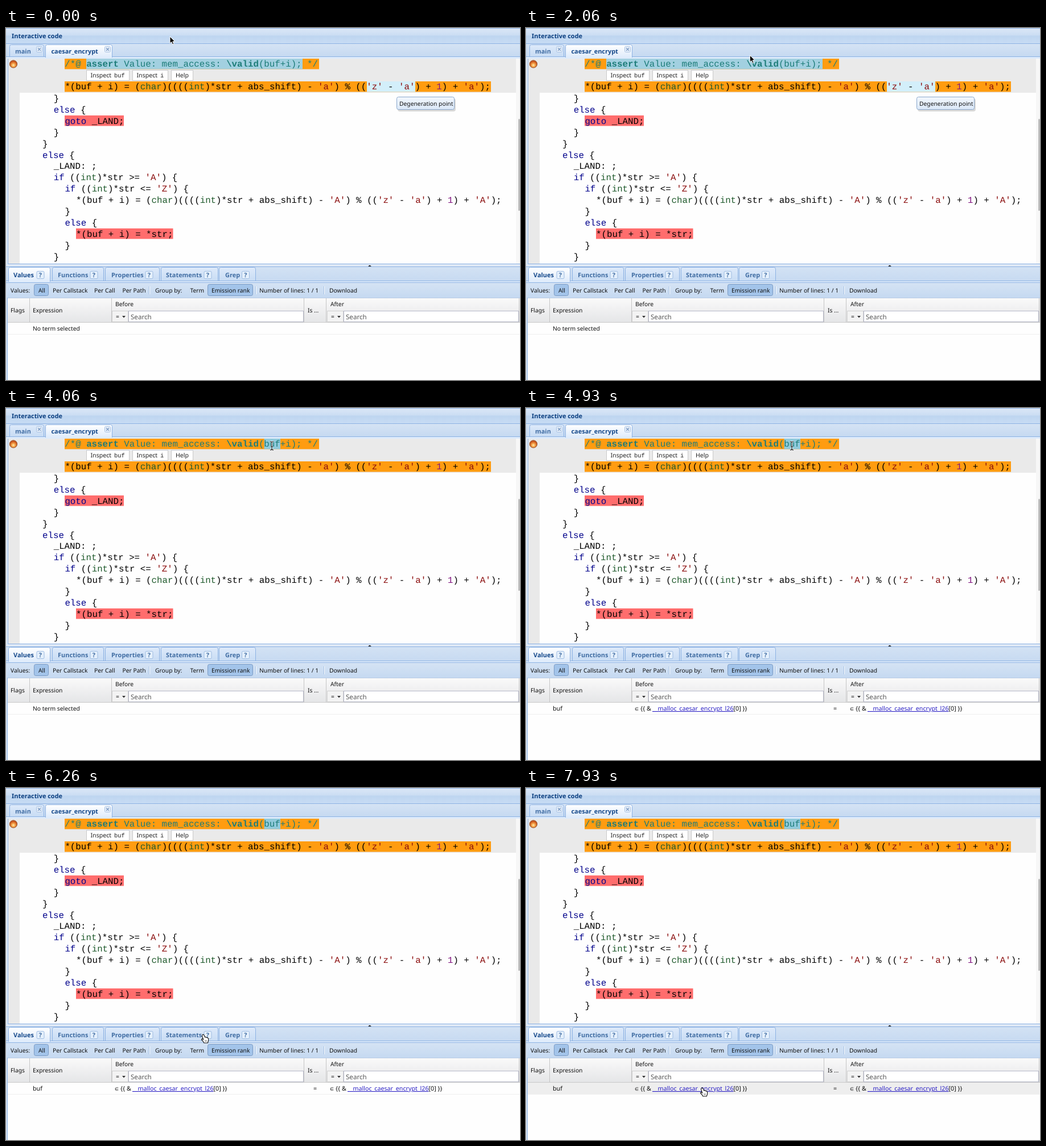
Animation of 903 by 620 pixels, one loop 8 s. Source, as an HTML page:

```html
<!DOCTYPE html>
<html lang="en">
<head>
<meta charset="utf-8">
<title>Interactive code</title>
<style>
html, body { margin: 0; width: 100%; height: 100%; overflow: hidden; background: #fefefe; }
svg { display: block; width: 903px; height: 620px; }
text { white-space: pre; text-rendering: geometricPrecision; font: 10.3px "Noto Sans", sans-serif; fill: #111; }
text.code { font: 15.78px "Liberation Mono", monospace; fill: #000; }
text.bold { font-weight: 700; font-size: 10.95px; fill: #416da3; }
text.dark { fill: #15498b; }
text.title { fill: #0b3f80; }
text.button { font-size: 10.6px; fill: #222; }
text.mono { font: 10.5px "Liberation Mono", monospace; fill: #222; }
text.search { font-size: 11.6px; fill: #555; }
text.cell { font-size: 10.7px; }
text.member { font: 8px "DejaVu Sans", sans-serif; }
.keyword { fill: #00008b; }
.type { fill: #1f5a2c; }
.char { fill: #8b0d0d; }
.number { fill: #80127e; }
.comment { fill: #1c7c78; }
.strong { font-weight: 700; }
.link { fill: #2a1fc4; text-decoration: underline; }
</style>
</head>
<body>
<svg id="stage" viewBox="0 0 903 620">
  <defs>
    <linearGradient id="header" x2="0" y2="1"><stop stop-color="#dce8f7"/><stop offset=".45" stop-color="#cbddf3"/><stop offset=".5" stop-color="#bed5f0"/><stop offset="1" stop-color="#c8dcf4"/></linearGradient>
    <linearGradient id="strip" x2="0" y2="1"><stop stop-color="#d5e3f4"/><stop offset="1" stop-color="#c5d9f1"/></linearGradient>
    <linearGradient id="tab" x2="0" y2="1"><stop stop-color="#deeafa"/><stop offset="1" stop-color="#c8dcf4"/></linearGradient>
    <linearGradient id="activeTab" x2="0" y2="1"><stop stop-color="#fff"/><stop offset="1" stop-color="#deebfb"/></linearGradient>
    <linearGradient id="columns" x2="0" y2="1"><stop stop-color="#fafafa"/><stop offset="1" stop-color="#e4e5e7"/></linearGradient>
    <linearGradient id="tip" x2="0" y2="1"><stop stop-color="#f2f7fe"/><stop offset="1" stop-color="#dbe8f8"/></linearGradient>
    <radialGradient id="ember" cy=".65"><stop stop-color="#fff0b8"/><stop offset=".45" stop-color="#f6a54a"/><stop offset="1" stop-color="#c9541c"/></radialGradient>
  </defs>
</svg>
<script>
const stage = document.getElementById('stage');

function add(parent, name, attributes, content = '') {
  const node = document.createElementNS('http://www.w3.org/2000/svg', name);
  for (const key in attributes) node.setAttribute(key, attributes[key]);
  node.textContent = content;
  return parent.appendChild(node);
}
const group = () => add(stage, 'g', {});
const rect = (parent, x, y, right, bottom, fill, more = {}) =>
  add(parent, 'rect', { x, y, width: right - x, height: bottom - y, fill, ...more });
const path = (parent, d, fill, more = {}) => add(parent, 'path', { d, fill, ...more });
const label = (parent, x, y, content, style = '') => add(parent, 'text', { x, y, class: style }, content);
const framed = (x, y, right, bottom, fill, stroke, rx = 0, parent = stage) =>
  rect(parent, x + .5, y + .5, right - .5, bottom - .5, fill, { stroke, rx });

function spans(parent, x, y, style, parts) {
  const text = label(parent, x, y, '', style);
  for (const [content, cls = ''] of parts) add(text, 'tspan', { class: cls }, content);
}

const COLUMN = 9.468, ORANGE = '#ff9c10', TEAL = '#a2d0e0', RED = '#ff6d6d', EDGE = '#8db2e3';
const indent = level => 64 + 19.7 * level;
const mark = (parent, y, from, to, fill) => rect(parent, from, y - 14, to, y + 4.5, fill);

function codeLine(level, y, source) {
  const styles = [[/^'/, 'char'], [/^(if|else|goto)$/, 'keyword'], [/^(char|int)$/, 'type'], [/^1$/, 'number']];
  const parts = source.split(/('.'|\b(?:if|else|goto|char|int|1)\b)/).filter(Boolean)
    .map(token => [token, (styles.find(([pattern]) => pattern.test(token)) || [])[1]]);
  spans(stage, indent(level), y, 'code', parts);
}

// Title bar and file tabs
rect(stage, 0, 0, 903, 620, '#fefefe');
rect(stage, 0, 0, 903, 28, 'url(#header)');
rect(stage, 0, 0, 903, 1, EDGE);
rect(stage, 0, 27, 903, 28, EDGE);
rect(stage, 0, 28, 903, 51, 'url(#strip)');
rect(stage, 0, 51, 903, 54, '#deebfb');
rect(stage, 0, 50, 903, 51, EDGE);
label(stage, 10, 18, 'Interactive code', 'bold title');

function tab(left, top, right, bottom, active) {
  path(stage, `M${left + .5} ${bottom}V${top + 3.5}q0-3 3-3H${right - 3.5}q3 0 3 3V${bottom}`,
    active ? 'url(#activeTab)' : 'url(#tab)', { stroke: EDGE });
}
for (const [left, right, textX, name, active] of [[6, 67, 16, 'main', false], [69, 187, 79.5, 'caesar_encrypt', true]]) {
  tab(left, 29, right, active ? 52 : 50, active);
  label(stage, textX, 45, name, 'bold' + (active ? ' dark' : ''));
  framed(right - 14, 32, right - 3, 43, '#e6effa', '#a9c2e2', 2);
  path(stage, `M${right - 11} 35l5 5m0-5l-5 5`, 'none', { stroke: '#7d9cc5', 'stroke-width': 1.4 });
}

// Code panel
rect(stage, 4, 54, 24, 416, '#e9e9e9');
rect(stage, 24, 54, 896, 114, '#eaeaea');
rect(stage, 0, 54, 3, 416, '#dfe9f6');
rect(stage, 3, 54, 4, 416, EDGE);
rect(stage, 896, 54, 903, 416, '#f7f7f7');
rect(stage, 900, 160, 903, 322, '#bcbcbc', { rx: 1.5 });
add(stage, 'circle', { cx: 13, cy: 63.5, r: 6.6, fill: 'url(#ember)', stroke: '#8d5130' });

mark(stage, 68, 103, 550, ORANGE);
mark(stage, 108, 103, 852, ORANGE);
const columnX = n => 103.3 + COLUMN * n;
const startMarks = group(), hoverMarks = group();
mark(startMarks, 68, 141, 521, TEAL);
mark(startMarks, 108, 634, 719, '#d3effa');
mark(hoverMarks, 68, columnX(37), columnX(40), '#90cadb');
mark(stage, 168, 103, 207, RED);
mark(stage, 367, 123, 293.5, RED);

spans(stage, 103.3, 68, 'code comment', [['/*@ ', 'comment'], ['assert', 'comment strong'],
  [' Value: mem_access: ', 'comment'], ['\\valid', 'comment strong'], ['(buf+i); */', 'comment']]);
const shifted = letter =>
  `*(buf + i) = (char)((((int)*str + abs_shift) - '${letter}') % (('z' - 'a') + 1) + '${letter}');`;
codeLine(2, 108, shifted('a'));
[[1, '}'], [1, 'else {'], [2, 'goto _LAND;'], [1, '}'], [0, '}'], [0, 'else {'], [1, '_LAND: ;'],
 [1, "if ((int)*str >= 'A') {"], [2, "if ((int)*str <= 'Z') {"], [3, shifted('A')], [2, '}'],
 [2, 'else {'], [3, '*(buf + i) = *str;'], [2, '}'], [1, '}']]
  .forEach(([level, source], i) => codeLine(level, 129 + 19.9 * i, source));

for (const [left, right] of [[141, 217], [222, 285], [290, 329]]) framed(left, 74, right, 93, '#fff', '#c9c9c9');
label(stage, 148.5, 87, 'Inspect', 'button');
label(stage, 190, 87, 'buf', 'mono');
label(stage, 229.5, 87, 'Inspect', 'button');
label(stage, 271, 87, 'i', 'mono');
label(stage, 298, 87, 'Help', 'button');

const tooltip = group();
rect(tooltip, 688, 124, 790, 147, '#000', { rx: 4, opacity: .15 });
framed(686, 121, 788, 144, 'url(#tip)', '#8ba8cc', 3, tooltip);
label(tooltip, 691, 137, 'Degeneration point');

// Lower tabs
rect(stage, 0, 416, 903, 449, 'url(#strip)');
rect(stage, 3, 415, 903, 416, EDGE);
rect(stage, 0, 416, 903, 420, '#dfe9f6');
rect(stage, 0, 420, 903, 421, EDGE);
path(stage, 'M636 420l3-2.5 3 2.5z', '#222');
rect(stage, 0, 446, 903, 449, '#deebfb');
rect(stage, 0, 445, 903, 446, EDGE);
for (const [left, right, textX, markX, name] of [[4, 78, 13, 60.5, 'Values'], [81, 172, 91, 154.5, 'Functions'],
  [174, 270, 185, 251.5, 'Properties'], [272, 373, 281, 354.5, 'Statements'], [374, 439, 385, 421, 'Grep']]) {
  const active = name === 'Values';
  tab(left, 421, right, active ? 447 : 445, active);
  label(stage, textX, 439, name, 'bold' + (active ? ' dark' : ''));
  framed(markX - 7, 428, markX + 7, 442, '#e5f0fc', '#9dbbe0', 2);
  label(stage, markX - 2.7, 439, '?', 'bold');
}

// Toolbar
rect(stage, 0, 449, 903, 475, 'url(#strip)');
rect(stage, 0, 448, 903, 449, EDGE);
framed(49, 451, 75, 472, '#a3c4ea', '#7a9ac4', 3);
framed(354, 451, 434, 472, '#a3c4ea', '#7a9ac4', 3);
for (const x of [251, 438, 558]) {
  rect(stage, x, 455, x + 1, 469, '#a3bfe2');
  rect(stage, x + 1, 455, x + 2, 469, '#fff');
}
for (const [x, name] of [[8, 'Values:'], [57, 'All'], [82, 'Per Callstack'], [155, 'Per Call'], [204.5, 'Per Path'],
  [262, 'Group by:'], [323.5, 'Term'], [361, 'Emission rank'], [445, 'Number of lines: 1 / 1'], [568, 'Download']])
  label(stage, x, 466, name);

// Value table
rect(stage, 3, 475, 903, 519, 'url(#columns)');
rect(stage, 3, 475, 903, 476, '#b8cbe4');
rect(stage, 3, 518, 903, 519, '#c9c9c9');
for (const x of [41, 185, 523, 562, 901]) rect(stage, x, 476, x + 1, 518, '#c5c5c5');
label(stage, 8, 501, 'Flags');
label(stage, 47, 501, 'Expression');
label(stage, 192, 490, 'Before');
label(stage, 530, 501, 'Is ...');
label(stage, 570, 490, 'After');
for (const x of [187, 565]) {
  framed(x - 1, 498, x + 28, 518, '#f3f3f3', '#d0d0d0');
  label(stage, x + 6, 512, '=');
  path(stage, `M${x + 17} 507h6l-3 3.5z`, '#333');
  framed(x + 28, 498, x + 336, 518, '#fff', '#b5b8c8');
  label(stage, x + 32, 513, 'Search', 'search');
}
const rowHover = rect(stage, 3, 519, 902, 540, '#eeeeee');
rect(stage, 3, 539, 902, 540, '#eeeeee');
const emptyRow = group(), valueRow = group();
label(emptyRow, 47, 533, 'No term selected');
label(valueRow, 47, 533, 'buf', 'cell');
label(valueRow, 540, 533, '=', 'cell');
for (const x of [191, 569]) {
  label(valueRow, x, 533, '∈', 'member');
  label(valueRow, x + 10, 533, '{{ &', 'cell');
  spans(valueRow, x + 31, 533, 'cell', [['__malloc_caesar_encrypt_l26', 'link'], ['[0] }}']]);
}
rect(stage, 0, 449, 2, 620, '#d3e1f3');
rect(stage, 2, 475, 3, 620, EDGE);

// Pointers, each with its hot spot at the origin
const cursors = { arrow: group(), beam: group(), hand: group() };
path(cursors.arrow, 'M0 0V12.2L2.8 9.6 4.7 14 6.8 13.1 4.9 8.8H8.8Z', '#000', { stroke: '#fff', 'stroke-width': 1 });
for (const [stroke, width] of [['#fff', 2.6], ['#111', 1.1]])
  path(cursors.beam, 'M-3-7Q0-7 0-5Q0-7 3-7M0-5V6M-3 8Q0 8 0 6Q0 8 3 8M-2 2H2', 'none', { stroke, 'stroke-width': width });
path(cursors.hand, 'M-3-5Q-1.5-7 0-4.5L1.5-1Q3-2.2 3.8-.5Q5.4-1.4 6 .4Q7.6 0 7.6 2V5Q7 7 6.3 9H-.2Q-1.5 6-4.3 3.5Q-5 1.4-2.8 2L-1.2 3.2-3.4-3Z',
  '#fff', { stroke: '#111', 'stroke-width': 1.1, 'stroke-linejoin': 'round' });
path(cursors.hand, 'M2 4v3M4 4v3', 'none', { stroke: '#555', 'stroke-width': .8 });

const waypoints = [[0, 288, 15], [1000, 344, 36], [3460, 467, 66], [5260, 467, 66], [6130, 348, 440],
  [6330, 348, 440], [6930, 290, 518], [7130, 265, 566], [7330, 268, 563], [7860, 311, 534], [8000, 311, 534]];

function pointerAt(time) {
  const next = waypoints.findIndex(([at]) => at > time);
  const [t0, x0, y0] = waypoints[next - 1], [t1, x1, y1] = waypoints[next];
  const p = (time - t0) / (t1 - t0), eased = p * p * (3 - 2 * p);
  return [x0 + (x1 - x0) * eased, y0 + (y1 - y0) * eased];
}

const show = (node, visible) => node.setAttribute('visibility', visible ? 'visible' : 'hidden');
const LOOP = 8000, STEP = LOOP / 120;

function render(now) {
  const time = Math.floor(((now % LOOP) + 7) / STEP) * STEP % LOOP;
  const hovered = time >= 3525, evaluated = time >= 4260;
  const [x, y] = pointerAt(time);
  show(startMarks, !hovered);
  show(tooltip, !hovered);
  show(hoverMarks, hovered);
  show(emptyRow, !evaluated);
  show(valueRow, evaluated);
  show(rowHover, time > 7200 && y < 540);

  const overTabs = time > 5500 && y > 421 && y < 446;
  const overLink = time > 7200 && y < 538;
  const kind = overTabs || overLink ? 'hand' : hovered && time < 5400 ? 'beam' : 'arrow';
  for (const name in cursors) show(cursors[name], name === kind);
  cursors[kind].setAttribute('transform', `translate(${x.toFixed(1)} ${y.toFixed(1)})`);
}

const start = performance.now();
function tick() {
  render(performance.now() - start);
  requestAnimationFrame(tick);
}
tick();
</script>
</body>
</html>
```
